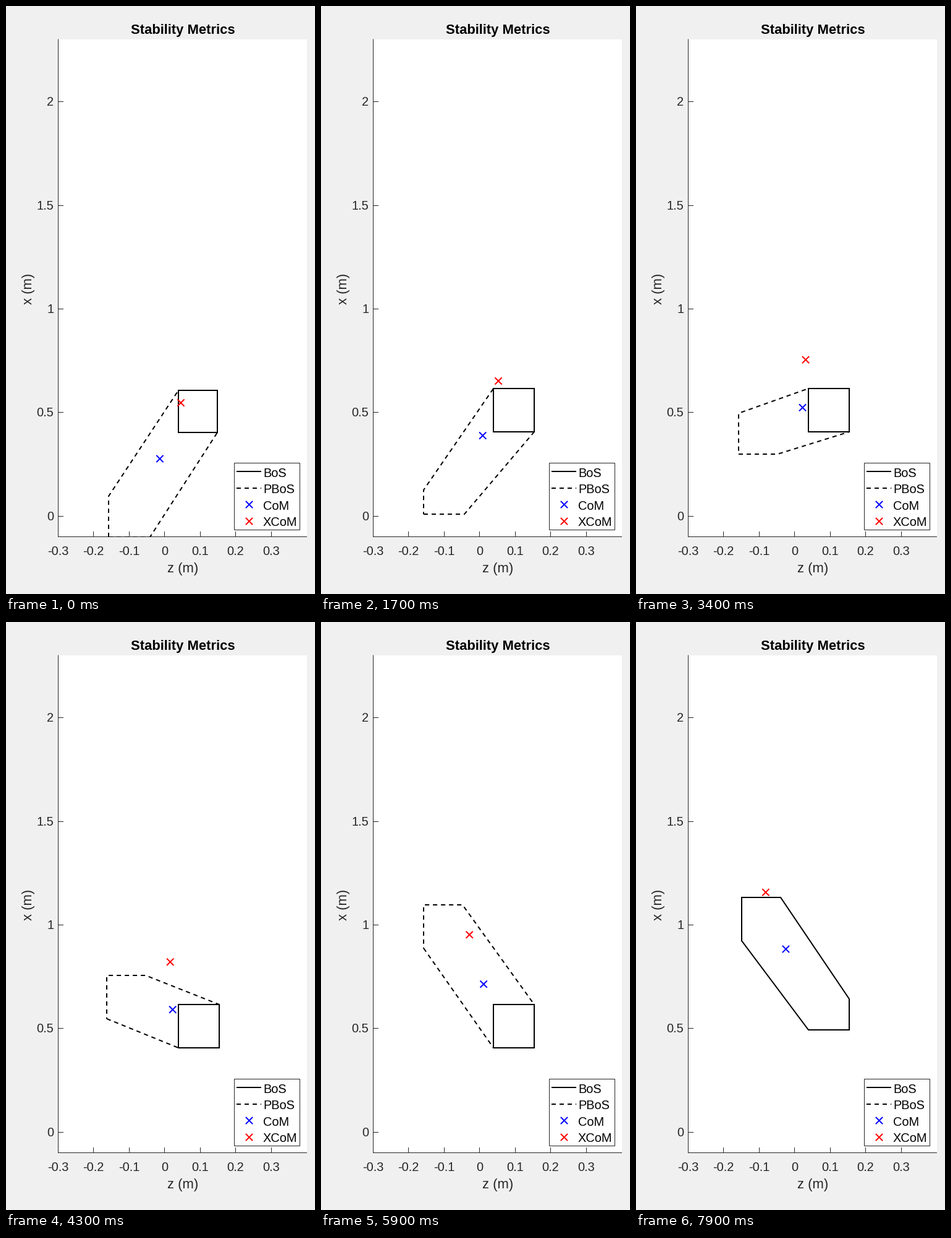
These frames come from a looping animation (500x950 px, 8 s). A matplotlib script:

```python
import numpy as np
import matplotlib.pyplot as plt
from matplotlib.animation import FuncAnimation
from matplotlib.patches import Rectangle

W, H, DPI = 500, 950, 100
PX = 72 / DPI
HOLD = 4          # steps the opening pose is held
STRIKE = 60       # step at which the swing foot lands
INK = "#262626"
DASH = (0, (3.5, 3))

plt.rcParams["font.family"] = "Liberation Sans"


def smooth(k, a, b):
    s = np.clip((k - a) / (b - a), 0, 1)
    return s * s * (3 - 2 * s)


def bump(k, mid, width):
    return np.exp(-0.5 * ((k - mid) / width) ** 2)


def corners(l, t, r, b):
    l, t, r, b = np.round([l, t, r, b])
    return [(l, b), (r, b), (r, t), (l, t)]


def stance(k):
    """Planted foot: settles at first, rolls up onto the toe after the strike."""
    settle = np.exp(-k / 7)
    lift = max(0, k - STRIKE)
    return corners(279, 618 + 3 * settle - 0.6 * lift,
                   345 - 2.5 * settle, 688 + settle - 0.13 * lift ** 2)


def swing(k):
    """Swinging foot: eases forward, foreshortened while the toe points down."""
    left = 166 + 5 * smooth(k, 50, 62) - 6.5 * bump(k, 46, 6)
    top = 792.5 - 346 * smooth(k, 7.5, 60.5) - 0.13 * max(0, k - STRIKE)
    width = 63.5 + 4 * bump(k, 6, 8)
    height = 70 - 32 * bump(k, 15, 7.5)
    return corners(left, top, left + width, top + height)


def com(k):
    """Centre of mass: steady progress with a sideways arc."""
    return np.array([270 - 0.0172 * (k - 35) ** 2,
                     731.5 - 2.707 * k - 2.5 * np.sin(2 * np.pi * k / 75)])


def xcom(k):
    """Extrapolated centre of mass, leading the centre of mass."""
    side = np.pi * k / 70
    pace = 2 * np.pi * (k - 5) / 68
    return com(k) + [31 * np.cos(side) + 3 * np.cos(3 * side),
                     -82.5 - 7.5 * np.cos(pace) - 2 * np.cos(2 * pace)]


def hull(pts):
    """Closed convex hull, starting at the lower left."""
    pts = sorted(pts, key=lambda p: (p[0], -p[1]))

    def chain(seq):
        out = []
        for p in seq:
            while len(out) > 1:
                (x0, y0), (x1, y1) = out[-2:]
                if (x1 - x0) * (p[1] - y0) - (y1 - y0) * (p[0] - x0) < 0:
                    break
                out.pop()
            out.append(p)
        return out
    return chain(pts) + chain(pts[::-1])[1:]


fig = plt.figure(figsize=(W / DPI, H / DPI), dpi=DPI, facecolor="#f0f0f0")
ax = fig.add_axes([0, 0, 1, 1])
ax.set_xlim(0, W)
ax.set_ylim(H, 0)
ax.axis("off")


def line(x, y, width=2, color="black", **kw):
    return ax.plot(x, y, color=color, lw=width * PX, snap=False, **kw)[0]


def cross_path(x, y, r=5.6):
    return ([x - r, x + r, np.nan, x - r, x + r],
            [y - r, y + r, np.nan, y + r, y - r])


def cross(x, y, color, z):
    return line(*cross_path(x, y), color=color, zorder=z, solid_capstyle="butt")


def label(x, y, text, size=20, ha="center", color=INK, **kw):
    ax.text(x, y, text, fontsize=size * PX, ha=ha, va="baseline",
            color=color, zorder=9, **kw)


# Plot area, axes and ticks
area = Rectangle((84.5, 54), 402.5, 803.5, fc="white", ec="none", zorder=0, snap=False)
ax.add_patch(area)
line([84.5, 84.5], [54, 857.5], 1, INK)
line([84.5, 486.5], [857.5, 857.5], 1, INK)
for i in range(7):
    x = 84.5 + round(57.43 * i)
    line([x, x], [849.5, 857.5], 1, INK)
    label(x, 887, f"{(i - 3) / 10:g}")
for i in range(5):
    y = 824.5 - round(167.5 * i)
    line([84.5, 92.5], [y, y], 1, INK)
    label(77.5, y + 6.5, f"{i / 2:g}", ha="right")
label(286, 45.5, "Stability Metrics", 22, color="black", weight="bold")
label(286, 915.5, "z (m)", 22)
label(42, 457, "x (m)", 22, rotation=90, rotation_mode="anchor")

# Legend
ax.add_patch(Rectangle((369.5, 738.5), 106, 108, fc="white", ec=INK, lw=PX,
                       zorder=7, snap=False))
line([373, 413], [752, 752], zorder=8, solid_capstyle="butt")
line([373, 413], [779, 779], zorder=8, ls=DASH)
cross(393.5, 805.5, "blue", 8)
cross(393.5, 832.5, "red", 8)
for i, name in enumerate(["BoS", "PBoS", "CoM", "XCoM"]):
    label(416, 761 + 26.4 * i, name, ha="left", color="black")

# Moving parts
pbos = line([], [], ls=DASH, zorder=4)
bos = line([], [], zorder=5, solid_joinstyle="miter")
com_mark = cross(0, 0, "blue", 6)
xcom_mark = cross(0, 0, "red", 6)
for part in (pbos, bos):
    part.set_clip_path(area)


def draw(n):
    k = max(0, n - HOLD)
    foot = stance(k)
    outline = hull(foot + swing(k))
    landed = k >= STRIKE
    pbos.set_data(*zip(*outline))
    pbos.set_visible(not landed)
    bos.set_data(*zip(*(outline if landed else foot + foot[:1])))
    com_mark.set_data(*cross_path(*com(k)))
    xcom_mark.set_data(*cross_path(*xcom(k)))
    return pbos, bos, com_mark, xcom_mark


anim = FuncAnimation(fig, draw, frames=80, interval=100, init_func=lambda: draw(0),
                     repeat=True, repeat_delay=0, blit=False)
plt.show()
```
